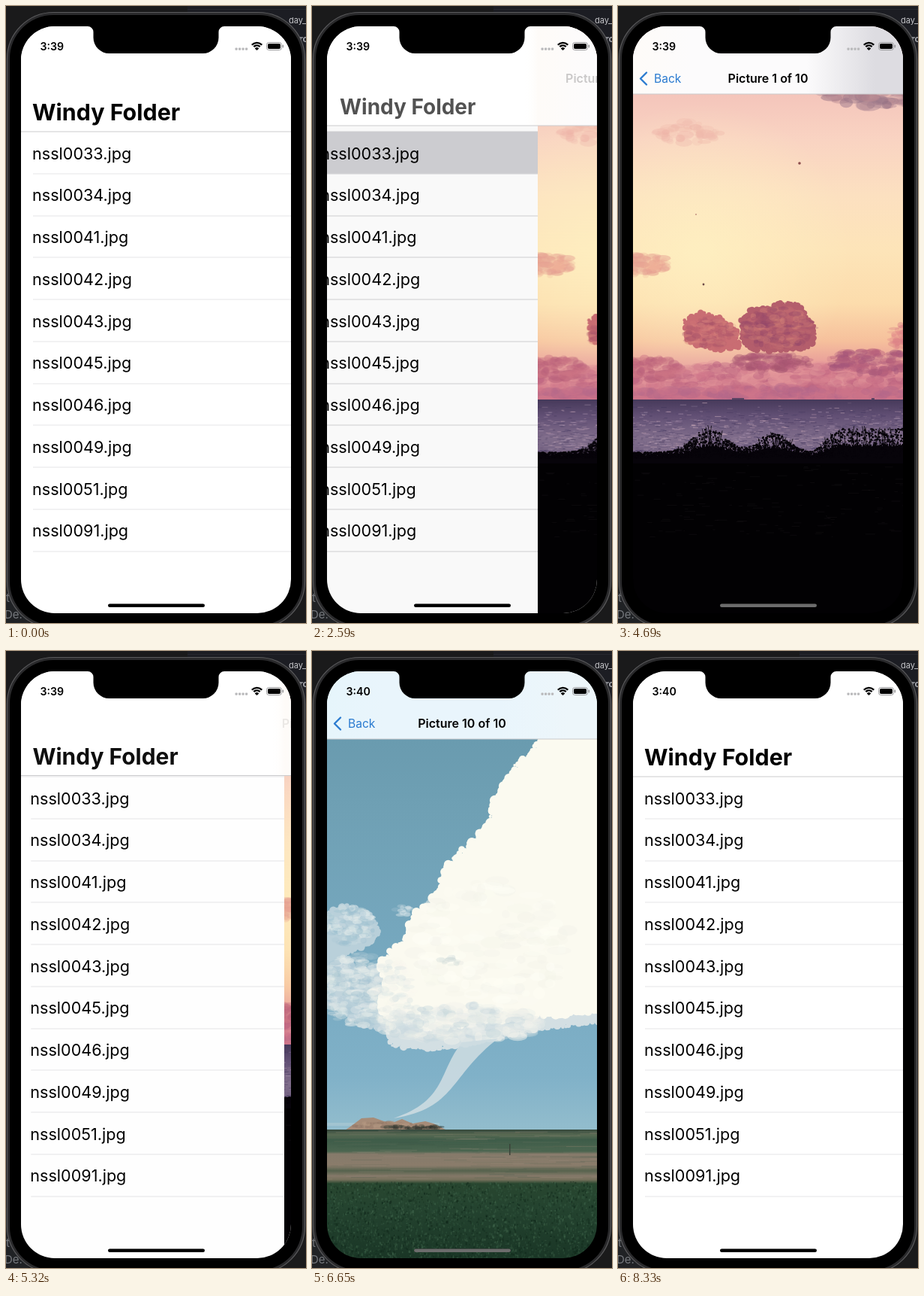
Recreate the animation shown at these times as an HTML page with a canvas. Size 400x820 px, loop 8.4 s.

```html
<!DOCTYPE html>
<html lang="en">
<head>
<meta charset="utf-8">
<title>Phone list demo</title>
<style>
html, body { margin: 0; width: 100%; height: 100%; overflow: hidden; background: #1a1a1b; }
canvas { display: block; width: 400px; height: 820px; }
</style>
</head>
<body>
<canvas id="stage" width="400" height="820"></canvas>
<script>
const LOOP = 8400, STEP = 70;
const LEFT = 20, TOP = 27, W = 360, H = 780;
const ROW = 55.75, LIST_TOP = 167;
const FONT = 'Inter, Roboto, "Liberation Sans", sans-serif';
const files = [33, 34, 41, 42, 43, 45, 46, 49, 51, 91].map(n => `nssl00${n}.jpg`);
const ctx = document.getElementById('stage').getContext('2d');

const lerp = (a, b, p) => a + (b - a) * p;
const clamp = v => Math.max(0, Math.min(1, v));
const smooth = v => { const p = clamp(v); return p * p * (3 - 2 * p); };
// critically damped spring: 1 at the start, settling at 0
const spring = ms => ms <= 0 ? 1 : ms > 620 ? 0 : (1 + 0.0113 * ms) * Math.exp(-0.0113 * ms);

let seed = 7;
function rnd(a = 0, b = 1) {
  seed = (seed * 1664525 + 1013904223) >>> 0;
  return a + (b - a) * seed / 4294967296;
}

function rect(g, x, y, w, h, color) {
  g.fillStyle = color;
  g.fillRect(x, y, w, h);
}

function round(g, x, y, w, h, r, color) {
  g.beginPath();
  g.roundRect(x, y, w, h, r);
  if (color) { g.fillStyle = color; g.fill(); }
}

function dot(g, x, y, r, color) {
  g.fillStyle = color;
  g.beginPath();
  g.arc(x, y, r, 0, 7);
  g.fill();
}

function text(g, str, x, y, size, weight, color, align = 'left') {
  g.font = `${weight} ${size}px ${FONT}`;
  g.textAlign = align;
  g.fillStyle = color;
  g.fillText(str, x, y);
}

function ramp(g, x0, y0, x1, y1, stops) {
  const grad = g.createLinearGradient(x0, y0, x1, y1);
  stops.forEach(([p, c]) => grad.addColorStop(p, c));
  return grad;
}

// polygon with a billowing edge
function puff(g, pts, r, color) {
  g.fillStyle = color;
  g.beginPath();
  pts.forEach(p => g.lineTo(...p));
  g.fill();
  pts.forEach((p, i) => {
    const q = pts[(i + 1) % pts.length];
    const n = Math.ceil(Math.hypot(q[0] - p[0], q[1] - p[1]) / (r * 0.3));
    for (let j = 0; j < n; j++) {
      const x = lerp(p[0], q[0], j / n) + rnd(-r, r) * 0.5;
      const y = lerp(p[1], q[1], j / n) + rnd(-r, r) * 0.5;
      dot(g, x, y, r * rnd(0.2, 0.9), color);
    }
  });
}

// loose heap of soft tufts
function tufts(g, x, y, rx, ry, n, r, colors) {
  for (let i = 0; i < n; i++) {
    const a = rnd(0, 6.283), d = Math.sqrt(rnd());
    g.globalAlpha = rnd(0.15, 0.5);
    g.fillStyle = colors[i % colors.length];
    g.beginPath();
    g.ellipse(x + Math.cos(a) * d * rx, y + Math.sin(a) * d * ry,
      r * rnd(0.4, 1.3), r * rnd(0.25, 0.65), 0, 0, 7);
    g.fill();
  }
  g.globalAlpha = 1;
}

function picture(paint) {
  const c = document.createElement('canvas');
  c.width = W;
  c.height = H;
  const g = c.getContext('2d');
  g.translate(-LEFT, -TOP);
  paint(g);
  return c;
}

const sunset = picture(g => {
  rect(g, 20, 27, W, 500, ramp(g, 0, 27, 0, 525, [
    [0, '#e5b0b2'], [0.18, '#f4c5bb'], [0.3, '#f9d3c2'], [0.45, '#fce0c0'],
    [0.6, '#fde4b8'], [0.74, '#fcdcac'], [0.84, '#f6c09c'], [0.91, '#e6989a'], [1, '#cb7188']]));
  const glow = g.createRadialGradient(110, 330, 10, 110, 330, 200);
  glow.addColorStop(0, 'rgba(255,242,195,.7)');
  glow.addColorStop(1, 'rgba(255,242,195,0)');
  rect(g, 20, 117, W, 400, glow);

  tufts(g, 350, 110, 85, 24, 170, 13, ['#a17c8c', '#b98a92', '#8e6c82']);
  tufts(g, 92, 168, 45, 15, 45, 10, ['#eeb4a8', '#f0bcae']);
  tufts(g, 34, 343, 32, 15, 90, 9, ['#e59f92', '#efaf97']);
  tufts(g, 376, 438, 12, 17, 50, 7, ['#e2898a', '#d97f86']);

  tufts(g, 200, 495, 190, 20, 420, 11, ['#d0768a', '#e2959a', '#bb6380']);
  tufts(g, 200, 514, 190, 7, 180, 11, ['#cc7389', '#b4688a']);
  tufts(g, 45, 482, 38, 15, 110, 8, ['#b8607a', '#cb7484']);
  tufts(g, 335, 473, 55, 16, 150, 8, ['#a5567a', '#b9627c']);
  tufts(g, 205, 474, 55, 11, 110, 8, ['#b55f7c', '#a5546f']);

  puff(g, [[88, 420], [110, 409], [136, 416], [158, 434], [160, 452], [130, 456], [95, 446]], 5, '#c96d73');
  tufts(g, 123, 435, 34, 20, 160, 6, ['#b95f6e', '#d9857d', '#a9556a']);
  puff(g, [[166, 420], [180, 404], [204, 402], [215, 395], [240, 398], [250, 414],
    [262, 425], [260, 450], [230, 456], [180, 456], [165, 442]], 5, '#b45e6c');
  tufts(g, 214, 428, 45, 27, 260, 7, ['#a2506a', '#c46d72', '#95486a', '#cf7e76']);

  rect(g, 20, 523, W, 90, ramp(g, 0, 523, 0, 608, [
    [0, '#46395a'], [0.25, '#614f74'], [0.6, '#806d8b'], [1, '#6d5c7d']]));
  for (let i = 0; i < 1700; i++) {
    const y = 524 + 78 * Math.sqrt(rnd());
    g.globalAlpha = rnd(0.15, 0.6);
    rect(g, rnd(15, 380), y, rnd(2, 9), 1, ['#b49db6', '#40345a', '#c9a9b8', '#4e4168'][i % 4]);
  }
  g.globalAlpha = 1;
  rect(g, 152, 521, 16, 2, '#5c4463');
  rect(g, 338, 521, 4, 2, '#5c4463');

  const shrub = '#07040a';
  const bush = x => 8 + 32 * Math.exp(-(((x - 122) / 30) ** 2)) + 25 * Math.exp(-(((x - 207) / 28) ** 2))
    + 31 * smooth((x - 255) / 45);
  for (let x = 20; x < 380; x++) {
    const top = 601 - 0.4 * bush(x) - rnd(0, 4);
    rect(g, x, top, 1, 807 - top, shrub);
  }
  for (let i = 0; i < 2000; i++) {
    const x = rnd(20, 380);
    dot(g, x, 601 - bush(x) * rnd() ** 0.9, rnd(0.5, 1.6), shrub);
  }
  g.strokeStyle = shrub;
  g.lineWidth = 0.8;
  for (let i = 0; i < 150; i++) {
    const x = rnd(20, 380);
    g.beginPath();
    g.moveTo(x, 600 - bush(x) * 0.4);
    g.lineTo(x + rnd(-7, 7), 601 - bush(x) * rnd(0.7, 1.15));
    g.stroke();
  }
  rect(g, 20, 608, W, 199, '#020103');
  for (let i = 0; i < 130; i++) rect(g, rnd(20, 380), rnd(610, 705), rnd(2, 15), 1, 'rgba(45,40,46,.2)');
  dot(g, 242, 209, 1.8, '#8b4c4c');
  dot(g, 114, 370, 1.4, '#6d4a48');
  dot(g, 104, 277, 1, '#c28f80');
});

const plains = picture(g => {
  rect(g, 20, 27, W, 612, ramp(g, 0, 27, 0, 638, [
    [0, '#6496aa'], [0.3, '#6fa0b4'], [0.65, '#77a9c0'], [0.88, '#80b1c8'], [1, '#93bdcd']]));
  puff(g, [[20, 350], [44, 340], [75, 348], [88, 372], [66, 392], [46, 402], [55, 428],
    [95, 420], [115, 505], [62, 495], [20, 462]], 6, '#b9d0da');
  tufts(g, 60, 450, 48, 48, 300, 8, ['#eaefec', '#a9c6d3', '#dce6e7']);
  tufts(g, 50, 365, 34, 25, 130, 7, ['#e6eeec', '#9dc0d0']);
  tufts(g, 122, 345, 12, 7, 20, 5, ['#d5e3e7']);
  puff(g, [[100, 500], [108, 522], [150, 527], [205, 522], [274, 505], [385, 490], [385, 440], [110, 450]],
    6, '#d3dfe3');
  puff(g, [[274, 155], [246, 193], [236, 237], [180, 287], [170, 325], [138, 353], [122, 388],
    [94, 412], [99, 450], [94, 480], [160, 500], [270, 485], [385, 475], [385, 90], [322, 105]], 8, '#fbfaf0');
  tufts(g, 200, 495, 110, 24, 260, 11, ['#e8edea', '#f3f3ec', '#c8d8de']);
  tufts(g, 240, 390, 105, 85, 160, 13, ['#fffef6', '#f3f3ea']);
  tufts(g, 185, 412, 16, 6, 14, 6, ['#d3dcda']);
  tufts(g, 105, 455, 28, 45, 120, 8, ['#f8f7ee', '#dbe5e5']);

  g.fillStyle = 'rgba(205,220,226,.9)';
  g.beginPath();
  g.moveTo(200, 520);
  g.bezierCurveTo(168, 560, 180, 597, 109, 621);
  g.bezierCurveTo(192, 608, 183, 565, 248, 515);
  g.fill();
  rect(g, 20, 627, 150, 4, 'rgba(180,205,214,.5)');

  g.fillStyle = '#a78c78';
  g.beginPath();
  g.moveTo(44, 637);
  [[54, 630], [66, 621], [82, 620], [96, 625], [110, 626], [120, 622], [134, 628],
    [151, 625], [162, 628], [178, 636]].forEach(p => g.lineTo(...p));
  g.fill();
  tufts(g, 95, 630, 40, 4, 50, 4, ['#8c7263', '#b89b84']);
  tufts(g, 135, 633, 42, 2.5, 60, 4, ['#29302b', '#3a4137']);

  rect(g, 20, 636, W, 171, ramp(g, 0, 636, 0, 807, [
    [0, '#33473c'], [0.04, '#596a53'], [0.08, '#3e5c49'], [0.17, '#4c6650'], [0.19, '#857a6a'],
    [0.28, '#8a7c6b'], [0.32, '#55624d'], [0.36, '#857969'], [0.39, '#75705b'], [0.42, '#28462f'],
    [0.6, '#24432f'], [1, '#1a3626']]));
  for (let i = 0; i < 170; i++) {
    g.globalAlpha = rnd(0.1, 0.3);
    rect(g, rnd(0, 380), rnd(637, 703), rnd(20, 70), 1, ['#a09180', '#3a5545', '#6f705b'][i % 3]);
  }
  for (let i = 0; i < 3000; i++) {
    g.globalAlpha = rnd(0.2, 0.6);
    rect(g, rnd(20, 380), rnd(705, 807), rnd(1, 2.5), rnd(1, 4), ['#41664c', '#0f2619', '#31553e'][i % 3]);
  }
  g.globalAlpha = 1;
  rect(g, 263, 655, 1.5, 15, '#3a4239');
});

const shots = [
  { img: sunset, title: 'Picture 1 of 10', row: 0, tint: ['#fefbf8', '#fcfbfc', '#dddce1'] },
  { img: plains, title: 'Picture 10 of 10', row: 9, tint: ['#e6f5fb', '#e9f5fc', '#edf6fa'] }
];
const moves = [
  { at: 2512, push: true, shot: shots[0] },
  { at: 4829, push: false, shot: shots[0] },
  { at: 6012, push: true, shot: shots[1] },
  { at: 7349, push: false, shot: shots[1] }
];

function slide(move, t) {
  if (!move) return 1;
  const s = spring(t - move.at);
  return move.push ? s : 1 - s;
}

function overscroll(t) {
  if (t < 880) return 0;
  return t < 1400 ? 45.5 * smooth((t - 880) / 520) : 45.5 * spring(t - 1400);
}

function drawDesk() {
  rect(ctx, 0, 0, 400, 820, '#1a1a1b');
  rect(ctx, 242, 0, 158, 90, '#1c1d23');
  rect(ctx, 242, 4, 158, 1, '#27282f');
  text(ctx, 'day_', 377, 23, 11, 400, '#c6c6ca');
  text(ctx, 'rc', 391, 48, 12, 700, '#a5a6ac');
  rect(ctx, 0, 740, 30, 80, '#202225');
  text(ctx, 't', 0, 792, 15, 400, '#777a7f');
  text(ctx, 'De.', -2, 814, 15, 400, '#777a7f');
  round(ctx, 1.5, 8.5, 397, 818, 62, '#2a2a2c');
  ctx.strokeStyle = '#5a5a5c';
  ctx.lineWidth = 1.2;
  ctx.stroke();
  round(ctx, 5, 12, 390, 811, 58, '#000');
}

function drawList(k, shift, row) {
  ctx.save();
  ctx.translate(-0.3 * W * (1 - k), shift);
  rect(ctx, 0, TOP - shift, 500, H, '#fff');
  if (row >= 0) rect(ctx, 0, LIST_TOP + row * ROW, 500, ROW, '#d1d1d5');
  const line = k < 0.96 ? '#d2d2d4' : '#e5e5e7';
  if (k < 1) rect(ctx, 0, LIST_TOP - 0.5, 500, 1, line);
  files.forEach((name, i) => {
    const y = LIST_TOP + i * ROW;
    text(ctx, name, 35, y + 36.5, 21.6, 400, '#000');
    rect(ctx, 36, Math.round(y + ROW) - 0.5, 460, 1, line);
  });
  ctx.restore();
  if (k < 1) rect(ctx, LEFT, TOP, W, H, `rgba(0,0,0,${0.1 * (1 - k)})`);
}

function drawBar(k, kb, shift, hide, move) {
  const bottom = lerp(117, LIST_TOP, kb) + shift, edge = LEFT + W * k;
  ctx.save();
  ctx.translate(0, -hide);
  rect(ctx, LEFT, TOP, W, bottom - TOP, '#fff');
  if (k < 1) {
    const [a, b, c] = move.shot.tint;
    rect(ctx, LEFT, TOP, W, bottom - TOP, ramp(ctx, edge - 18, 0, edge + W, 0,
      [[0, 'rgba(255,255,255,0)'], [0.05, a], [0.25, b], [0.66, b], [0.9, c], [1, c]]));
  }
  rect(ctx, LEFT, bottom - 0.5, W, 1, '#cbcbcd');

  ctx.globalAlpha = clamp((kb - 0.5) * 2);
  const size = 30.4 * lerp(0.5, 1, kb) * (1 + 0.025 * shift / 37);
  text(ctx, 'Windy Folder', lerp(48, 35, kb), lerp(102, 152, kb) + shift, size, 700, '#000');

  if (k < 1) {
    ctx.globalAlpha = clamp(1 - 0.95 * kb);
    text(ctx, move.shot.title, 200 + 228 * kb, 102, 16, 600, '#000', 'center');
    ctx.globalAlpha = clamp(1 - 2.05 * kb);
    text(ctx, 'Back', 48 + kb * (move.push ? 21 : -7), 102 + 50 * kb, 15.6 * (1 + 0.95 * kb), 400, '#2b7bd0');
    ctx.globalAlpha = clamp(1 - 3.2 * kb);
    ctx.strokeStyle = '#2b7bd0';
    ctx.lineWidth = 2.4;
    ctx.lineCap = ctx.lineJoin = 'round';
    ctx.beginPath();
    ctx.moveTo(38, 88.5);
    ctx.lineTo(30, 96.5);
    ctx.lineTo(38, 104.5);
    ctx.stroke();
  }
  ctx.restore();
}

function drawStatus(clock) {
  text(ctx, clock, 45.5, 58.5, 14.2, 600, '#000');
  for (let i = 0; i < 4; i++) round(ctx, 305.5 + i * 4.5, 55.5, 3.2, 3.2, 1, '#b9b9bb');
  ctx.strokeStyle = '#000';
  ctx.lineCap = 'butt';
  ctx.lineWidth = 2.3;
  [9.2, 5.7].forEach(r => {
    ctx.beginPath();
    ctx.arc(334.5, 58, r, -Math.PI * 0.76, -Math.PI * 0.24);
    ctx.stroke();
  });
  ctx.fillStyle = '#000';
  ctx.beginPath();
  ctx.moveTo(334.5, 59);
  ctx.arc(334.5, 59, 3.8, -Math.PI * 0.76, -Math.PI * 0.24);
  ctx.fill();
  round(ctx, 347.5, 48.5, 20, 10, 3);
  ctx.strokeStyle = '#9a9a9c';
  ctx.lineWidth = 1;
  ctx.stroke();
  round(ctx, 349, 50, 17, 7, 1.8, '#000');
  round(ctx, 368.6, 51.5, 1.5, 4, 1, '#9a9a9c');
}

// black over the list, grey over a picture
function drawHomeBar(edge) {
  const x = 136, y = 794.5, w = 129, h = 4.6;
  round(ctx, x, y, w, h, 2.3, '#000');
  ctx.save();
  ctx.beginPath();
  ctx.rect(edge, TOP, W, H);
  ctx.clip();
  round(ctx, x, y, w, h, 2.3, '#6c6c6c');
  ctx.restore();
}

function drawNotch() {
  ctx.fillStyle = '#000';
  ctx.beginPath();
  ctx.moveTo(109, 26);
  ctx.lineTo(109, 27);
  ctx.arcTo(116.5, 27, 116.5, 35, 7.5);
  ctx.arcTo(116.5, 63, 140, 63, 21);
  ctx.arcTo(283.5, 63, 283.5, 40, 21);
  ctx.arcTo(283.5, 27, 291, 27, 7.5);
  ctx.lineTo(291, 26);
  ctx.fill();
}

function draw(t) {
  const move = moves.filter(m => t >= m.at).pop();
  const k = slide(move, t), kb = slide(move, t - 15);
  const shift = move ? 0 : overscroll(t);
  const hide = 92 * (smooth((t - 3880) / 320) - smooth((t - 4370) / 320));
  const edge = LEFT + W * k;

  drawDesk();
  ctx.save();
  round(ctx, LEFT, TOP, W, H, 45);
  ctx.clip();
  if (k > 0) drawList(k, shift, move && move.push ? move.shot.row : -1);
  if (k < 1) ctx.drawImage(move.shot.img, edge, TOP);
  drawBar(k, kb, shift, hide, move);
  drawStatus(t < 6020 ? '3:39' : '3:40');
  drawHomeBar(edge);
  ctx.restore();
  drawNotch();
}

const start = performance.now();
function tick() {
  const t = (performance.now() - start) % LOOP;
  draw(Math.floor(t / STEP) * STEP);
  requestAnimationFrame(tick);
}
tick();
</script>
</body>
</html>
```
